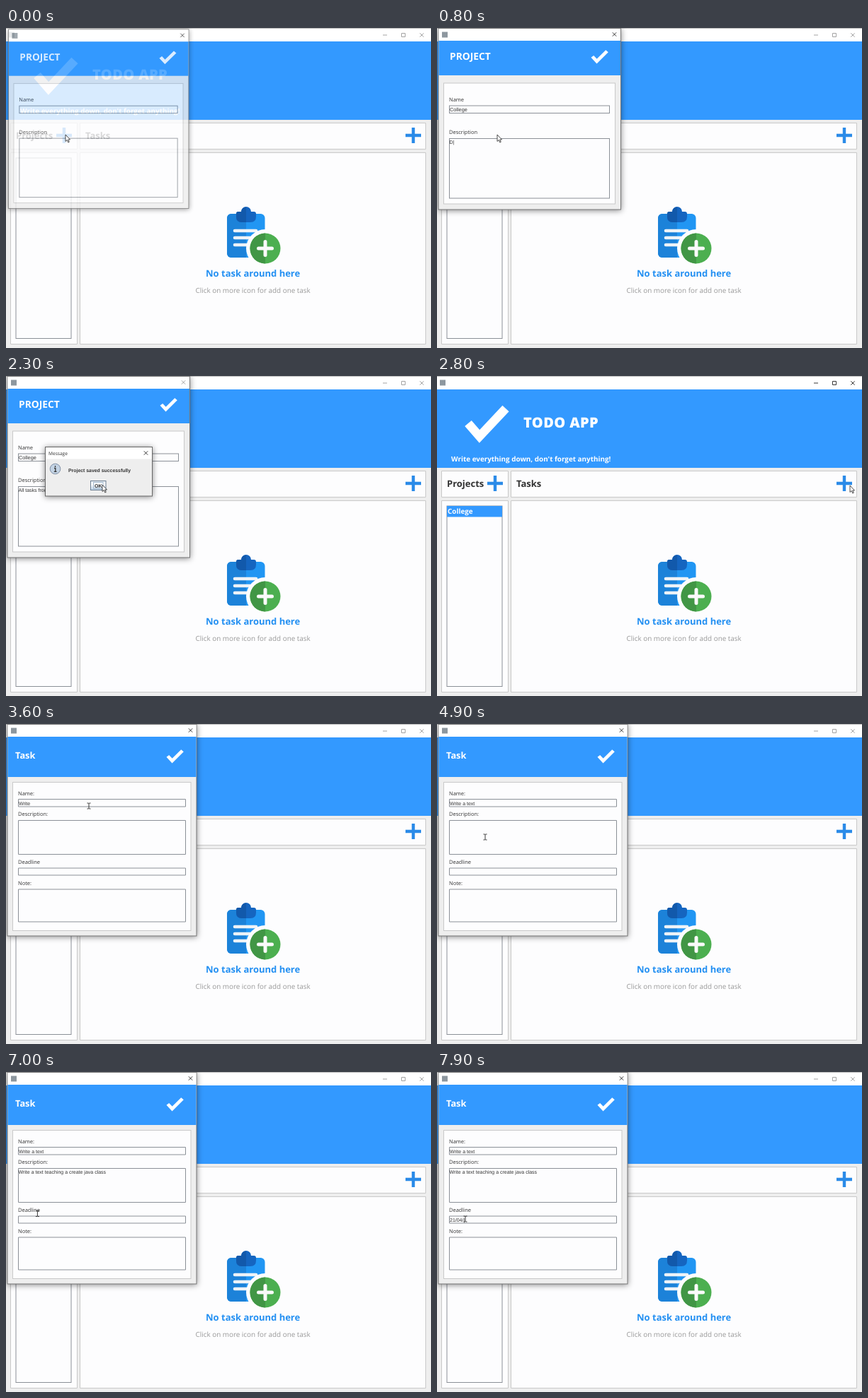
Recreate the animation shown at these times as an HTML page. Size 600 px wide and 453 px high, loop 8 s.

```html
<!DOCTYPE html>
<html lang="en">
<head>
<meta charset="utf-8">
<title>Todo app</title>
<style>
html, body { margin: 0; width: 100%; height: 100%; overflow: hidden; background: #eee; }
svg { display: block; width: 600px; height: 453px; text-rendering: geometricPrecision; }
text { font-family: "Open Sans", "Noto Sans", sans-serif; fill: #333; white-space: pre; }
.b { font-weight: 700; }
.w { fill: #fff; }
.label { font-size: 7.5px; }
.input { font-family: "Liberation Sans", Arial, sans-serif; font-size: 7px; }
.blue { fill: #39f; }
.panel { fill: #fdfdfe; stroke: #c9c9c9; }
.field { fill: #fdfdfe; stroke: #8b9097; }
.cross { stroke: #222; stroke-width: .9; fill: none; }
.dim .cross { stroke: #999; }
.dialog { filter: drop-shadow(0 1px 4px #0007); }
</style>
</head>
<body>
<svg viewBox="0 0 600 453">
  <defs>
    <path id="check" d="M6 26L22 44.5 59 5" fill="none" stroke="#fff" stroke-width="12.5"/>
    <path id="plus" d="M-11 0H11M0-11V11" stroke="#2b8be8" stroke-width="4.4"/>
    <path id="cross" d="M-2.7-2.7L2.7 2.7M2.7-2.7L-2.7 2.7"/>
    <rect id="icon" x="4" y="5.5" width="8" height="8" fill="#8d979f"/>
    <linearGradient id="metal" x2="0" y2="1">
      <stop stop-color="#e4edf5"/><stop offset=".4" stop-color="#fff"/><stop offset="1" stop-color="#b8cfe5"/>
    </linearGradient>
  </defs>

  <g id="main">
    <rect width="600" height="453" fill="#eee"/>
    <rect width="600" height="19" fill="#fff"/>
    <path d="M0 .5H600" stroke="#bbb"/>
    <use href="#icon"/>
    <path class="cross" d="M532 10H538M558.5 7.5H563.5V12.5H558.5Z"/>
    <use href="#cross" class="cross" x="587" y="10"/>
    <rect class="blue" y="19" width="600" height="111"/>
    <use href="#check" x="38" y="41"/>
    <text class="b w" x="122" y="73" style="font-size:20px;font-weight:800;letter-spacing:.4px">TODO APP</text>
    <text class="b w" x="20" y="121" font-size="9.9">Write everything down, don't forget anything!</text>
    <g class="panel">
      <path d="M6.5 134.5H100.5V171.5H6.5ZM104.5 134.5H592.5V171.5H104.5ZM6.5 176.5H100.5V447.5H6.5ZM104.5 176.5H592.5V447.5H104.5Z"/>
    </g>
    <text class="b" x="14" y="157" font-size="13">Projects</text>
    <text class="b" x="112" y="157" font-size="13">Tasks</text>
    <use href="#plus" x="82" y="152"/>
    <use href="#plus" x="575" y="152"/>
    <rect class="field" x="14" y="184" width="78" height="255.5"/>
    <g id="item">
      <rect id="selection" class="blue" x="14" y="184" width="78" height="15.5"/>
      <text id="itemText" class="b" x="15" y="195.3" font-size="9.9">College</text>
    </g>

    <rect x="312" y="263" width="53.5" height="62" rx="6" fill="#2196f3"/>
    <path d="M339 263H318a6 6 0 0 0-6 6V319a6 6 0 0 0 6 6H339Z" fill="#1c82d9"/>
    <path d="M325 263q0-3 3-3h4a7 7 0 0 1 14 0h4q3 0 3 3v4q0 8-8 8h-12q-8 0-8-8Z" fill="#1565c0"/>
    <path d="M339 253.500a7 7 0 0 0-7 6.500h-4q-3 0-3 3v4q0 8 8 8h6Z" fill="#1259ab"/>
    <path d="M323 287H353M323 297H345M323 307H340" stroke="#eef3f8" stroke-width="4.600" stroke-linecap="round"/>
    <circle cx="366" cy="312" r="27" fill="#fdfdfe"/>
    <circle cx="366" cy="312" r="21.500" fill="#4caf50"/>
    <path d="M366 290.500a21.500 21.500 0 0 0 0 43Z" fill="#419645"/>
    <path d="M356.500 312H375.500M366 302.500V321.500" stroke="#fafafa" stroke-width="5" stroke-linecap="round"/>
    <text class="b" x="282" y="351.500" font-size="13" style="fill:#2490f2">No task around here</text>
    <text x="267.500" y="375" font-size="9.900" style="fill:#999">Click on more icon for add one task</text>
  </g>

  <g id="project" class="dialog">
    <rect x="2" y=".5" width="257.500" height="256.500" fill="#eee" stroke="#777"/>
    <rect x="2.500" y="1" width="256.500" height="17" fill="#fff"/>
    <use href="#icon" x="3"/>
    <use href="#cross" class="cross" x="250.500" y="9"/>
    <rect class="blue" x="2.500" y="18" width="256.500" height="49"/>
    <text class="b w" x="18" y="45" font-size="13.800">PROJECT</text>
    <use href="#check" transform="translate(217 31) scale(.39 .36)"/>
    <rect class="panel" x="9.500" y="78" width="242" height="171"/>
    <text class="label" x="17" y="104">Name</text>
    <rect class="field" x="17.500" y="110" width="226" height="10.500"/>
    <text class="label" x="17" y="150">Description</text>
    <rect class="field" x="17.500" y="156.500" width="226" height="84.500"/>
    <text class="input" id="projectName" x="18" y="118" style="font-size:7.300px"></text>
    <text class="input" id="projectInfo" x="17.500" y="164"></text>
  </g>

  <g id="message" class="dialog">
    <rect x="55.500" y="100.500" width="151" height="69.500" fill="#eee" stroke="#666"/>
    <rect x="56" y="101" width="150" height="16.500" fill="#fff"/>
    <text x="60" y="111.800" font-size="6.600">Message</text>
    <use href="#cross" class="cross" x="197.500" y="109"/>
    <circle cx="69.500" cy="131.500" r="7.300" fill="#c3d3e4" stroke="#7f8ea3"/>
    <path d="M69.500 127V129M68 130.500H69.800V135M67.800 135.300H71.500" stroke="#333" stroke-width="1.300" fill="none"/>
    <text class="input b" x="88" y="135.800" style="font-size:6.900px">Project saved successfully</text>
    <rect x="119.500" y="148.500" width="21.500" height="13" fill="url(#metal)" stroke="#6d7f92"/>
    <rect x="123.500" y="150.500" width="13.500" height="9" fill="none" stroke="#a3b8cc"/>
    <text class="input b" x="125" y="157.500">OK</text>
  </g>

  <g id="task" class="dialog">
    <rect x="2" y=".5" width="267" height="299.500" fill="#eee" stroke="#777"/>
    <rect x="2.500" y="1" width="266" height="17" fill="#fff"/>
    <use href="#icon" x="3"/>
    <use href="#cross" class="cross" x="260.500" y="9"/>
    <rect class="blue" x="2.500" y="18" width="266" height="57"/>
    <text class="b w" x="13" y="49" font-size="12.800">Task</text>
    <use href="#check" transform="translate(226 36) scale(.39 .36)"/>
    <rect class="panel" x="9.500" y="82.500" width="251.500" height="210"/>
    <text class="label" x="17" y="100.500">Name:</text>
    <text class="label" x="17" y="130">Description:</text>
    <text class="label" x="17" y="198">Deadline</text>
    <text class="label" x="17" y="227.500">Note:</text>
    <path class="field" d="M17.500 106.500H253.500V117H17.500ZM17.500 136.500H253.500V184.500H17.500ZM17.500 204H253.500V214H17.500ZM17.500 234H253.500V280H17.500Z"/>
    <text class="input" id="taskName" x="18" y="114.500"></text>
    <text class="input" id="taskInfo" x="17.500" y="144"></text>
    <text class="input" id="deadline" x="18" y="212"></text>
  </g>

  <path id="arrow" d="M0 0V9.500L2.200 7.500 3.800 11 5.300 10.300 3.700 7H6.500Z" fill="#fff" stroke="#222" stroke-width=".8"/>
  <path id="beam" d="M-2.500-4H-.5L0-3.500 .5-4H2.500M0-3.500V3.500M-2.500 4H-.5L0 3.500 .5 4H2.500" fill="none" stroke="#222" stroke-width=".9"/>
</svg>
<script>
const el = id => document.getElementById(id);
const show = (id, on) => el(id).style.display = on ? "" : "none";

// pointer stops: time, x, y
const stops = [
  [0, 84, 151], [100, 85, 151], [1500, 85, 151], [1700, 229, 42], [1900, 229, 42],
  [2200, 136, 154], [2400, 136, 154], [2600, 40, 190], [2800, 583, 155], [2900, 583, 155],
  [3200, 117, 116], [4200, 117, 116], [4500, 68, 160], [6700, 68, 160], [7100, 40, 208], [8000, 40, 208]
];

function pointer(t) {
  const i = stops.findIndex(s => s[0] > t);
  const [a, b] = [stops[i - 1], stops[i]];
  const p = (t - a[0]) / (b[0] - a[0]);
  const k = p * p * (3 - 2 * p);
  return [1, 2].map(n => a[n] + (b[n] - a[n]) * k);
}

function type(id, text, t, start, end, caretEnd = 0) {
  const p = Math.min(1, Math.max(0, (t - start) / (end - start)));
  const caret = t >= start && t < caretEnd ? "|" : "";
  el(id).textContent = text.slice(0, Math.round(text.length * p)) + caret;
}

// a dialog opens slightly small and see-through
function openDialog(id, opening, cx, cy) {
  el(id).setAttribute("opacity", opening ? .82 : 1);
  el(id).setAttribute("transform", opening ? `translate(${cx} ${cy}) scale(.988) translate(${-cx} ${-cy})` : "");
}

function draw(t) {
  const inProject = t < 2500, inTask = t >= 3000, inMessage = t >= 1800 && t < 2400;
  show("project", inProject);
  show("message", inMessage);
  show("task", inTask);
  openDialog("project", t < 100, 130, 128);
  openDialog("task", t < 3100, 135, 150);
  el("main").classList.toggle("dim", inProject || inTask);
  el("project").classList.toggle("dim", inMessage);

  show("item", t >= 2500);
  show("selection", t >= 2600);
  el("itemText").classList.toggle("w", t >= 2600);

  type("projectName", "College", t, 100, 700);
  if (t < 1000) type("projectInfo", "D", t, 700, 800, 1000);
  else type("projectInfo", "All tasks from college", t, 1000, 1500, 1700);
  type("taskName", "Write a text", t, 3200, 4160);
  type("taskInfo", "Write a text teaching a create java class", t, 5100, 6514, 6700);
  type("deadline", "21/04/", t, 7300, 7900, 8000);

  const [x, y] = pointer(t);
  const overText = t >= 3200;
  show("arrow", !overText);
  show("beam", overText);
  el(overText ? "beam" : "arrow").setAttribute("transform", `translate(${x} ${y})`);
}

const origin = performance.now();
function loop() {
  const t = (performance.now() - origin) % 8000;
  draw(Math.floor(t / 100) * 100);
  requestAnimationFrame(loop);
}
loop();
</script>
</body>
</html>
```
